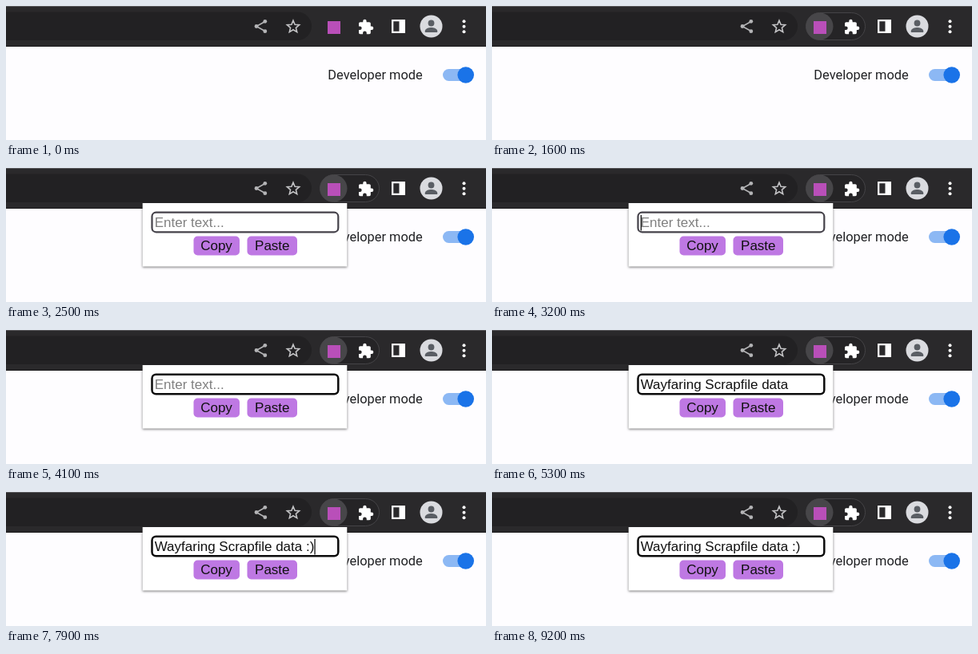
Write an HTML page that moves like this. It is 600 by 168 pixels and loops after 10 s.

```html
<!DOCTYPE html>
<html lang="en">
<head>
<meta charset="utf-8">
<style>
  html, body { margin: 0; width: 100%; height: 100%; overflow: hidden; background: #fefdff; }
  svg { display: block; width: 600px; height: 168px; }
  .form text { font: 17px "Liberation Sans", Arial, sans-serif; }
  .label { font: 16.4px Roboto, sans-serif; fill: #202124; }
  .popup { filter: drop-shadow(0 1px 1.5px rgba(0, 0, 0, .55)); }
</style>
</head>
<body>
<svg viewBox="0 0 600 168">
  <!-- toolbar -->
  <rect width="600" height="51" fill="#2a292b"/>
  <rect width="600" height="1" fill="#58575a"/>
  <rect y="50" width="600" height="1" fill="#19181a"/>
  <rect x="-30" y="7.5" width="412" height="35.5" rx="17.7" fill="#222123"/>

  <g fill="#b4b4b6" stroke="#b4b4b6">
    <path d="M323.800 19.500 313 25.500 323.800 31.500" fill="none" stroke-width="1.600"/>
    <g stroke="none">
      <circle cx="323.800" cy="19.300" r="2.400"/>
      <circle cx="313" cy="25.500" r="2.400"/>
      <circle cx="323.800" cy="31.700" r="2.400"/>
    </g>
  </g>
  <path id="star" fill="none" stroke="#c4c4c6" stroke-width="1.600"/>

  <g id="hover">
    <rect x="392.500" y="8.500" width="74" height="34" rx="17" fill="#252426" stroke="#454447"/>
    <circle cx="409.500" cy="25.500" r="17" fill="#474649"/>
  </g>
  <rect x="402" y="19" width="16" height="16" fill="#b94fb9"/>

  <path transform="translate(439.300 16) scale(.87)" fill="#fff"
    d="M20.500 11H19V7c0-1.100-.9-2-2-2h-4V3.500a2.500 2.500 0 0 0-5 0V5H4c-1.100 0-2 .9-2 2v3.800h1.500a2.700 2.700 0 0 1 0 5.400H2V20c0 1.100.9 2 2 2h3.800v-1.500a2.700 2.700 0 0 1 5.400 0V22H17c1.100 0 2-.9 2-2v-4h1.500a2.500 2.500 0 0 0 0-5z"/>
  <path fill="#fff" fill-rule="evenodd" d="M482 17h17v17h-17zM484.300 19.300v12.400h7.200v-12.400z"/>

  <circle cx="531.500" cy="25.500" r="14" fill="#dadbdf"/>
  <g fill="#5a5e64">
    <circle cx="531.500" cy="21.500" r="3.900"/>
    <path d="M523.800 33v-1.800c0-2.700 4.600-4.200 7.700-4.200s7.700 1.500 7.700 4.200V33z"/>
  </g>
  <g fill="#fff">
    <circle cx="572.500" cy="19.200" r="2"/>
    <circle cx="572.500" cy="25.700" r="2"/>
    <circle cx="572.500" cy="32.200" r="2"/>
  </g>

  <!-- page -->
  <text class="label" x="402.300" y="91.500">Developer mode</text>
  <rect x="546" y="79" width="36" height="15" rx="7.500" fill="#8cb8f4"/>
  <circle cx="574.700" cy="86.500" r="10.300" fill="#1a73e8"/>

  <!-- popup -->
  <g id="popup" class="form">
    <rect class="popup" x="170.700" y="44" width="255.600" height="79.500" fill="#fff"/>
    <rect id="field" x="182.500" y="55.700" width="232.800" height="24.600" rx="5" fill="#fff"/>
    <text id="entry" x="185.700" y="74" xml:space="preserve"></text>
    <rect id="caret" y="59" width="1.300" height="19.500" fill="#111"/>
    <g fill="#be78e3">
      <rect x="234.500" y="85.500" width="57.500" height="24" rx="5"/>
      <rect x="301.500" y="85.500" width="62.500" height="24" rx="5"/>
    </g>
    <g fill="#111" text-anchor="middle">
      <text x="263" y="103">Copy</text>
      <text x="332.800" y="103">Paste</text>
    </g>
  </g>
</svg>

<script>
const LOOP = 10000;
const [star, hover, popup, field, entry, caret] =
  ["star", "hover", "popup", "field", "entry", "caret"].map(id => document.getElementById(id));

const starPoints = Array.from({ length: 10 }, (_, i) => {
  const radius = i % 2 ? 3.6 : 8;
  const angle = i * Math.PI / 5 - Math.PI / 2;
  return [359 + radius * Math.cos(angle), 26.2 + radius * Math.sin(angle)];
});
star.setAttribute("d", "M" + starPoints.join("L") + "Z");

// Each entry is [start time, field content].
const entries = [
  [0, ""],
  [4300, "Wayfaring Scrapfile data"],
  [7200, "Wayfaring Scrapfile data "],
  [7500, "Wayfaring Scrapfile data :"],
  [7700, "Wayfaring Scrapfile data :)"],
];
const caretSpans = [
  [2700, 3300], [3500, 4100], [4300, 4900], [5500, 6100],
  [6700, 8300], [8900, 9200],
];

const show = (node, on) => node.setAttribute("visibility", on ? "visible" : "hidden");

function draw(t) {
  hover.setAttribute("opacity", t < 800 ? 0 : t < 900 ? 0.5 : 1);

  const open = t >= 1700;
  show(popup, open);

  const focused = t >= 3500;
  field.setAttribute("stroke", focused ? "#0c0c0c" : "#45424a");
  field.setAttribute("stroke-width", focused ? 2.5 : 2.2);

  const content = entries.findLast(([start]) => t >= start)[1];
  entry.textContent = content || "Enter text...";
  entry.setAttribute("fill", content ? "#111" : "#808080");

  const width = content ? entry.getComputedTextLength() : 0;
  caret.setAttribute("x", 185.7 + width);
  show(caret, open && caretSpans.some(([on, off]) => t >= on && t < off));
}

const origin = performance.now();
function frame() {
  draw((performance.now() - origin) % LOOP);
  requestAnimationFrame(frame);
}
frame();
</script>
</body>
</html>
```
